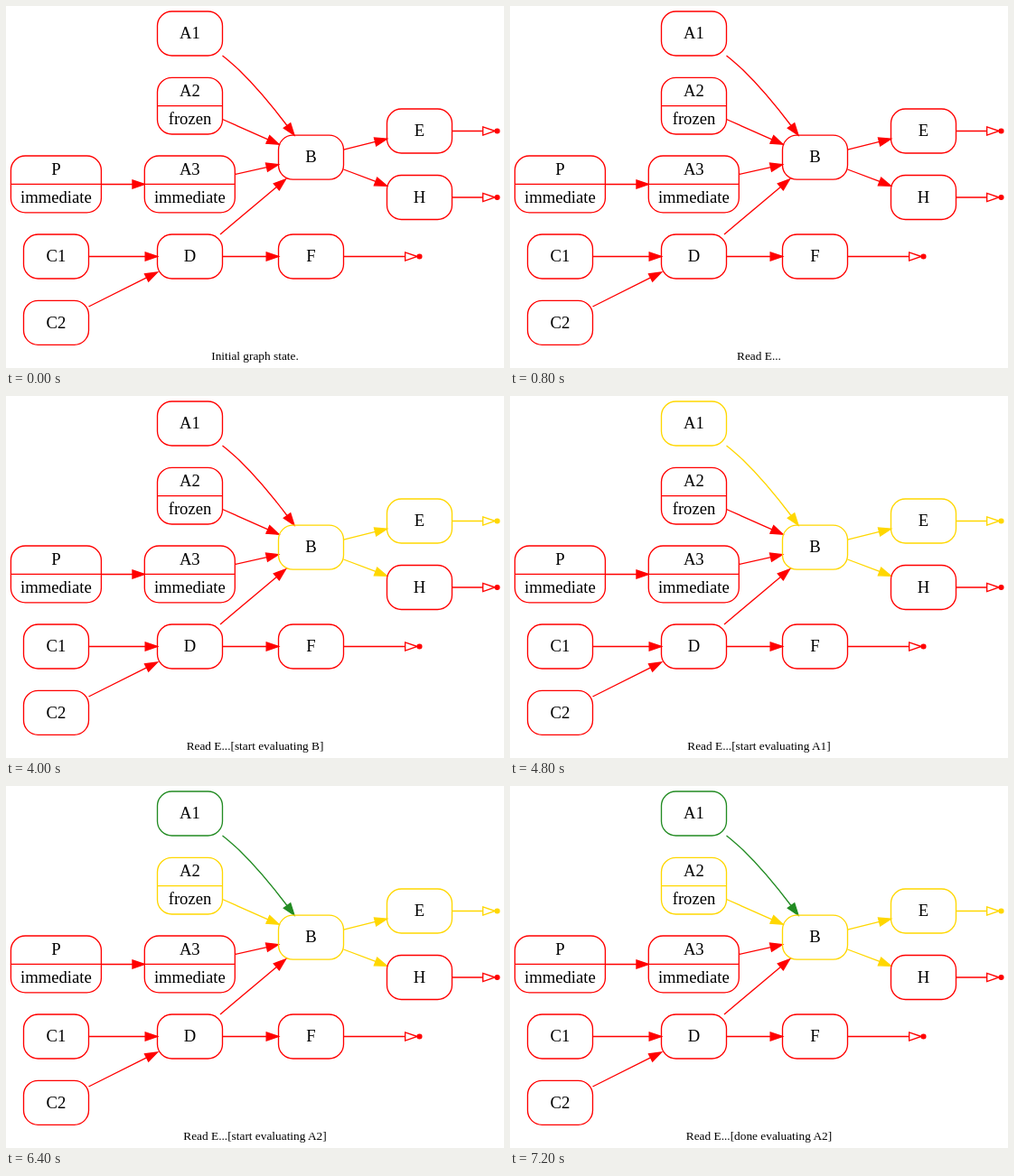
These frames come from a looping animation (551 by 401 pixels, 8 s). An HTML page:

```html
<!DOCTYPE html>
<html lang="en">
<head>
<meta charset="utf-8">
<title>Graph evaluation</title>
<style>
  html, body { margin: 0; width: 100%; height: 100%; overflow: hidden; background: #fff; }
  svg { display: block; }
  text { font: 18.667px "Liberation Serif", "Times New Roman", serif; text-anchor: middle; fill: #000; }
  #caption { font-size: 13.333px; }
  g { stroke-width: 1.333; }
</style>
</head>
<body>
<svg id="stage" width="551" height="401" viewBox="0 0 551 401">
  <text id="caption" x="275.5" y="391.5"></text>
</svg>
<script>
const RED = '#ff0000', GOLD = '#ffd700', GREEN = '#228b22';
const LOOP = 8000;
const stage = document.getElementById('stage');
const caption = document.getElementById('caption');

// name: [left, top, width, height, second line]
const nodes = {
  A1: [167.5, 6, 72, 49],
  A2: [167.5, 79.3, 72, 62.7, 'frozen'],
  A3: [153.3, 166, 100, 62.8, 'immediate'],
  P:  [5.4, 166, 100, 62.8, 'immediate'],
  B:  [301.5, 143.2, 72, 49],
  C1: [19.5, 253, 72, 49],
  C2: [19.5, 326.3, 72, 49],
  D:  [167.5, 253, 72, 49],
  E:  [421.5, 114, 72, 49],
  F:  [301.5, 253, 72, 49],
  H:  [421.5, 187.5, 72, 49]
};

// [from, x1, y1, tip x, tip y]
const edges = [
  ['P', 105.5, 197.5, 153.3, 197.5],
  ['A2', 239.5, 125.5, 302, 153.3],
  ['A3', 253.5, 186.5, 301.5, 175.7],
  ['D', 237, 253, 309.5, 191.8],
  ['D', 239.5, 277.5, 301.5, 277.5],
  ['C1', 91.5, 277.5, 167.5, 277.5],
  ['C2', 91.5, 333, 167.5, 295],
  ['B', 373.5, 159.2, 421.5, 147.2],
  ['B', 373.5, 181, 421.5, 199.2]
];

// [from, x1, y, tip x]
const outputs = [
  ['E', 493.5, 138.5, 541],
  ['H', 493.5, 212, 541],
  ['F', 373.5, 277.5, 455]
];

// [start ms, caption, colour changes]
const steps = [
  [0, 'Initial graph state.', {}],
  [800, 'Read E...', {}],
  [3200, 'Read E...[start evaluating E]', { E: GOLD }],
  [4000, 'Read E...[start evaluating B]', { B: GOLD }],
  [4800, 'Read E...[start evaluating A1]', { A1: GOLD }],
  [5600, 'Read E...[done evaluating A1]', {}],
  [6400, 'Read E...[start evaluating A2]', { A1: GREEN, A2: GOLD }],
  [7200, 'Read E...[done evaluating A2]', {}]
];

function add(parent, tag, attrs = {}, text = '') {
  const el = document.createElementNS('http://www.w3.org/2000/svg', tag);
  for (const key in attrs) el.setAttribute(key, attrs[key]);
  el.textContent = text;
  return parent.appendChild(el);
}

// Each group holds a node and its outgoing edges, sharing one colour.
const groups = {};

function drawNode(name, [x, y, w, h, extra]) {
  const g = groups[name] = add(stage, 'g');
  add(g, 'rect', { x, y, width: w, height: h, rx: 16, fill: 'none', stroke: 'currentColor' });
  const cx = x + w / 2, mid = y + h / 2;
  const label = (str, cy) => add(g, 'text', { x: cx, y: cy + 5.7 }, str);
  if (!extra) return label(name, mid);
  add(g, 'path', { d: `M${x} ${mid}h${w}`, stroke: 'currentColor' });
  label(name, y + h / 4 - 0.7);
  label(extra, y + h * 3 / 4 - 0.7);
}

function drawHead(g, x, y, angle, fill) {
  add(g, 'path', {
    d: 'M0 0L-13.33 -4.67V4.67Z', fill, stroke: 'currentColor',
    transform: `translate(${x} ${y}) rotate(${angle * 180 / Math.PI})`
  });
}

function drawLine(g, d) {
  add(g, 'path', { d, fill: 'none', stroke: 'currentColor' });
}

function drawEdge([from, x1, y1, x2, y2], fill = 'currentColor') {
  const g = groups[from], a = Math.atan2(y2 - y1, x2 - x1);
  drawLine(g, `M${x1} ${y1}L${x2 - 13.33 * Math.cos(a)} ${y2 - 13.33 * Math.sin(a)}`);
  drawHead(g, x2, y2, a, fill);
}

for (const name in nodes) drawNode(name, nodes[name]);
edges.forEach(e => drawEdge(e));
for (const [from, x, y, tip] of outputs) {
  drawEdge([from, x, y, tip, y], '#fff');
  add(groups[from], 'circle', { cx: tip + 2.5, cy: y, r: 2.4, fill: 'currentColor', stroke: 'currentColor' });
}
drawLine(groups.A1, 'M239.5 55C246 60 252 65.5 258 71C277 89.5 297 114 311 132.5');
drawHead(groups.A1, 319, 143.2, Math.atan2(10.7, 8), 'currentColor');

let shown = -1;
function show(index) {
  const colours = Object.assign({}, ...steps.slice(0, index + 1).map(s => s[2]));
  for (const name in groups) groups[name].style.color = colours[name] || RED;
  caption.textContent = steps[index][1];
  shown = index;
}

const start = performance.now();
function tick() {
  const t = (performance.now() - start) % LOOP;
  const index = steps.filter(s => s[0] <= t).length - 1;
  if (index !== shown) show(index);
  requestAnimationFrame(tick);
}
show(0);
tick();
</script>
</body>
</html>
```
